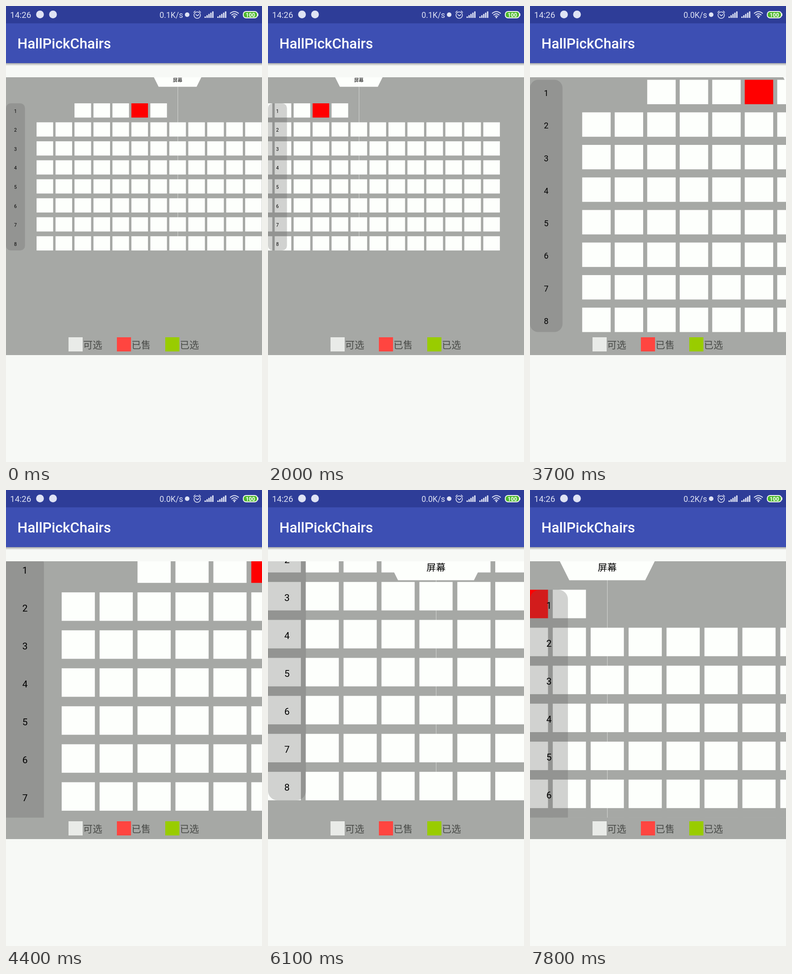
Recreate the animation shown at these times as an HTML page with a canvas. Size 561x998 px, loop 8000 ms.

```html
<!DOCTYPE html>
<html lang="zh">
<head>
<meta charset="utf-8">
<style>
  html, body { margin: 0; height: 100%; overflow: hidden; background: #f7f9f6; }
  canvas { display: block; }
</style>
</head>
<body>
<canvas id="stage" width="561" height="998"></canvas>
<script>
const ctx = document.getElementById('stage').getContext('2d');
const LOOP = 8000, STEP = 100;
const UNIT = 561 / 1080;              // device pixel to stage pixel
const PITCH = 80 * UNIT, SEAT_W = 70 * UNIT, SEAT_H = 60 * UNIT;
const ROWS = 8, COLS = 15, SOLD = 5;
const MAP_TOP = 156, MAP_BOTTOM = 717, PANEL_BOTTOM = 764;
const GREY = '#a6a8a5', SEAT = '#fdfffc', ICON = '#dfe3f4';
const LATIN = 'Roboto, sans-serif';
const CJK = '"Noto Sans CJK SC", "Noto Sans CJK", sans-serif';

// Gestures: first and last step time, then the seat origin and zoom they reach
const start = { x: 67, y: 213, s: 1 };
const gestures = [
  [1400, 1600, { x: -110, y: 213, s: 1 }],
  [2400, 2600, { x: 95.4, y: 213, s: 1 }],
  [3300, 3900, { x: 122, y: 140.9, s: 2 }],
  [4600, 4700, { x: 64, y: 84, s: 2 }],
  [5200, 5300, { x: 6.2, y: 27.2, s: 2 }],
  [6000, 6100, { x: -250, y: 35, s: 2 }],
  [6400, 6600, { x: -448.8, y: 43.8, s: 2 }],
  [6900, 7000, { x: -448.8, y: 131, s: 2 }],
  [7200, 7400, { x: -448.8, y: 218.3, s: 2 }]
];

function viewAt(t) {
  const now = Math.floor(t / STEP) * STEP;
  let view = start;
  for (const [from, to, goal] of gestures) {
    if (now < from) break;
    const p = Math.min(1, (now - from + STEP) / (to - from + STEP));
    const mix = k => view[k] + (goal[k] - view[k]) * p;
    view = { x: mix('x'), y: mix('y'), s: mix('s') };
  }
  return view;
}

function rect(color, x, y, w, h) {
  ctx.fillStyle = color;
  ctx.fillRect(x, y, w, h);
}

function text(str, x, y, font, color, align = 'left') {
  ctx.font = font;
  ctx.fillStyle = color;
  ctx.textAlign = align;
  ctx.fillText(str, x, y);
}

function disc(x, y, r) {
  ctx.fillStyle = ICON;
  ctx.beginPath();
  ctx.arc(x, y, r, 0, 7);
  ctx.fill();
}

function stroke(path, width, color = ICON) {
  ctx.strokeStyle = color;
  ctx.lineWidth = width;
  ctx.stroke(new Path2D(path));
}

function roundRect(color, x, y, w, h, r) {
  ctx.fillStyle = color;
  ctx.beginPath();
  ctx.roundRect(x, y, w, h, r);
  ctx.fill();
}

function drawStatusBar(t) {
  rect('#2e3d98', 0, 0, 561, 38);
  text('14:26', 9, 26, '18.5px ' + LATIN, ICON);
  disc(74.5, 18.5, 8.5);
  disc(103, 18.5, 8.5);
  const speed = t < 3600 ? '0.1' : t < 7800 ? '0.0' : '0.2';
  text(speed + 'K/s', 388, 26, '17.5px ' + LATIN, ICON, 'right');
  disc(397, 19, 5);
  // alarm clock
  stroke('M412 20a7 7 0 1 0 14 0a7 7 0 1 0-14 0M415.5 18l3.5 3.5 4-3M411 14.5l4-4M427 14.5l-4-4', 1.6);
  for (const x of [435, 463])
    for (let i = 0; i < 5; i++) rect(ICON, x + i * 4.2, 23 - i * 2.8, 3, 3 + i * 2.8);
  // wireless
  stroke('M491 16.5q9.5-8.5 19 0M494 20q6.5-6 13 0M497 23q3.5-3 7 0', 2);
  disc(500.5, 25, 1.8);
  // battery
  roundRect('#f4f7f4', 519, 11, 33, 16, 7);
  roundRect('#f4f7f4', 550, 16, 3, 6, 1);
  roundRect('#4cb82c', 521, 13, 29, 12, 5);
  text('100', 535.5, 23.5, 'bold 12px ' + LATIN, '#fff', 'center');
}

function drawToolbar() {
  const shadow = ctx.createLinearGradient(0, 125, 0, 131);
  shadow.addColorStop(0, 'rgba(0,0,0,.32)');
  shadow.addColorStop(1, 'rgba(0,0,0,0)');
  rect(shadow, 0, 125, 561, 6);
  rect('#3d4fb3', 0, 38, 561, 87);
  text('HallPickChairs', 25, 93, '500 31.2px ' + LATIN, '#fff');
}

function drawSeats({ x, y, s }) {
  const pitch = PITCH * s, w = SEAT_W * s, h = SEAT_H * s;
  for (let row = 0; row < ROWS; row++) {
    const [first, last] = row ? [0, COLS - 1] : [2, 6];
    for (let col = first; col <= last; col++) {
      const color = !row && col === SOLD ? '#f00' : SEAT;
      rect(color, x + col * pitch, y + row * pitch, w, h);
    }
  }
}

function drawRowNumbers({ y, s }) {
  const pitch = PITCH * s;
  roundRect('rgba(100,100,100,.287)', 0, y, pitch, pitch * 7 + SEAT_H * s, 10.4 * s);
  for (let row = 0; row < ROWS; row++)
    text(row + 1, pitch / 2, y + row * pitch + 20.8 * s, `${10.4 * s}px ${LATIN}`, '#000', 'center');
}

function drawScreen(mid, s) {
  const top = 52 * s, bottom = 41.6 * s, h = 20.8 * s;
  ctx.fillStyle = SEAT;
  ctx.fill(new Path2D(`M${mid - top} ${MAP_TOP}H${mid + top}L${mid + bottom} ${MAP_TOP + h}H${mid - bottom}Z`));
  text('屏幕', mid, MAP_TOP + 10.4 * s, `${10.4 * s}px ${CJK}`, '#000', 'center');
}

function drawMap(view) {
  const { x, y, s } = view;
  const mid = x + (7 * PITCH + SEAT_W / 2) * s;
  rect(GREY, 0, MAP_TOP, 561, PANEL_BOTTOM - MAP_TOP);
  ctx.save();
  ctx.beginPath();
  ctx.rect(0, MAP_TOP, 561, MAP_BOTTOM - MAP_TOP);
  ctx.clip();
  rect('#d3d5d2', Math.floor(mid), MAP_TOP, 1, y + 7 * PITCH * s - MAP_TOP);
  drawSeats(view);
  drawRowNumbers(view);
  drawScreen(mid, s);
  ctx.restore();
}

function drawLegend() {
  [['#e9ebe8', '可选'], ['#ff4540', '已售'], ['#99cc00', '已选']].forEach(([color, label], i) => {
    const x = 137 + i * 106;
    rect(color, x, 725, 31, 31);
    text(label, x + 32, 749, '21px ' + CJK, '#484a47');
  });
}

function frame(now) {
  const t = now % LOOP;
  rect('#f7f9f6', 0, 0, 561, 998);
  drawStatusBar(t);
  drawToolbar();
  drawMap(viewAt(t));
  drawLegend();
  requestAnimationFrame(frame);
}
requestAnimationFrame(frame);
</script>
</body>
</html>
```
